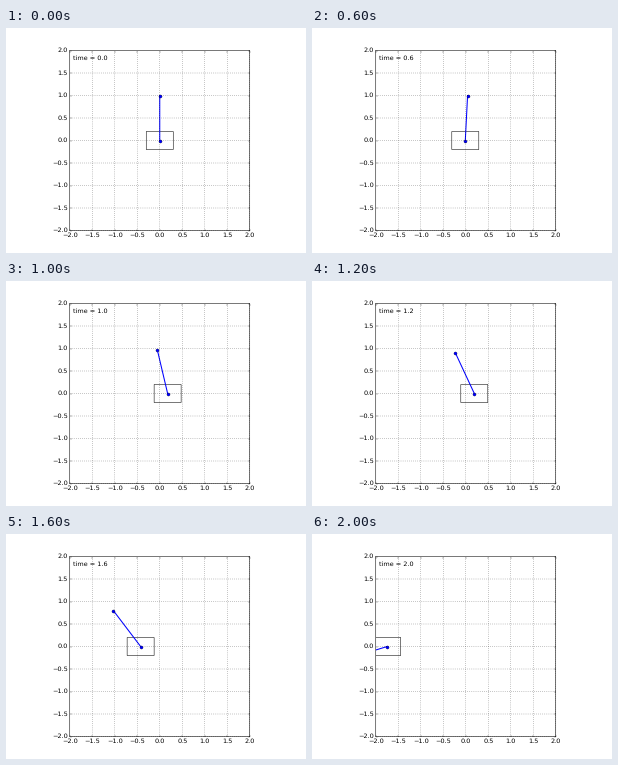
Write a matplotlib script that moves like this. It is 300 px wide and 225 px high and loops after 2100 ms.

```python
import matplotlib.pyplot as plt
import numpy as np
from matplotlib.animation import FuncAnimation
from matplotlib.patches import Rectangle

plt.style.use("classic")
plt.rcParams.update({
    "font.family": "DejaVu Sans",
    "font.size": 12.6,
    "figure.facecolor": "white",
    "savefig.dpi": "figure",
    "path.snap": False,
    "grid.linewidth": 0.8,
    "text.hinting": "none",
})

STEPS, DT = 21, 0.1
CART_W, CART_H = 0.6, 0.4

# Key poses after the first rest: time (s), cart position, pole angle (deg)
TIMES, *POSES = np.transpose([
    (0.2, 0.0, 0.0),
    (0.6, -0.01, 2.9),
    (1.0, 0.175, -13.3),
    (1.2, 0.19, -25.0),
    (1.6, -0.425, -37.2),
    (1.8, -0.98, -61.0),
    (2.0, -1.745, -107.0),
])


def glide(t, values):
    """Smooth cubic path through the key values, at rest before the first."""
    if t <= TIMES[0]:
        return values[0]
    slopes = np.gradient(values, TIMES)
    i = min(np.searchsorted(TIMES, t), len(TIMES) - 1)
    span = TIMES[i] - TIMES[i - 1]
    u = min((t - TIMES[i - 1]) / span, 1)
    ease = u * u * (3 - 2 * u)
    bend = u * (1 - u) * ((1 - u) * slopes[i - 1] - u * slopes[i])
    return values[i - 1] + ease * (values[i] - values[i - 1]) + span * bend


fig = plt.figure(figsize=(8, 6), dpi=37.5)
ax = fig.add_subplot(aspect="equal", xlim=(-2, 2), ylim=(-2, 2))
ax.grid()

cart = ax.add_patch(Rectangle((0, 0), CART_W, CART_H, fc="none", ec="k", lw=1))
pole, = ax.plot([], [], "o-", color="b", lw=2, ms=6)
label = ax.text(0.02, 0.95, "", transform=ax.transAxes)


def update(step):
    t = step * DT
    x, angle = (glide(t, values) for values in POSES)
    angle = np.radians(angle)
    cart.set_xy((x - CART_W / 2, -CART_H / 2))
    pole.set_data([x, x + np.sin(angle)], [0, np.cos(angle)])
    label.set_text(f"time = {t:.1f}")
    return cart, pole, label


anim = FuncAnimation(fig, update, frames=STEPS, interval=100, repeat=True,
                     repeat_delay=0)
plt.show()
```
